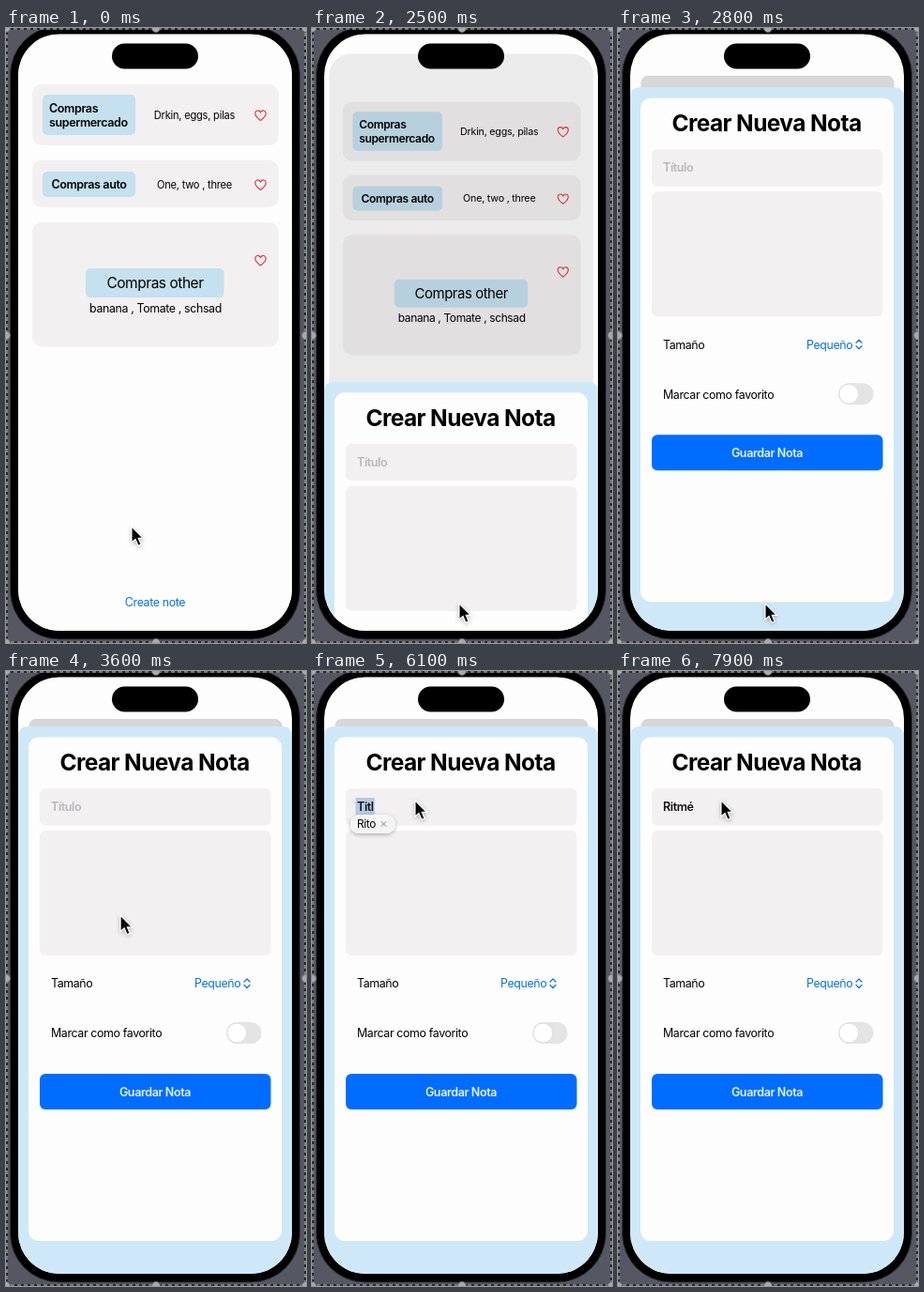
An HTML page for the animation above (8 s loop, 320 px wide and 655 px high).

```html
<!DOCTYPE html>
<html lang="es">
<head>
<meta charset="utf-8">
<title>Notas</title>
<style>
html, body { margin: 0; width: 100%; height: 100%; overflow: hidden; background: #555863; }
svg { display: block; width: 100vw; height: 100vh; }
text { font: 12.4px Inter, sans-serif; letter-spacing: -.03em; fill: #000; white-space: pre; }
.mid { text-anchor: middle; }
.bold { font-weight: 600; font-size: 12.5px; }
.small { font-size: 11.1px; letter-spacing: -.02em; }
.heading { font-size: 15.5px; }
.title { font-size: 24.5px; font-weight: 700; letter-spacing: -.025em; }
.link { fill: #0873e0; }
.card, .input { fill: #f2f0f1; }
.label { fill: #c5e0ee; }
.line { fill: none; stroke-linecap: round; stroke-linejoin: round; }
</style>
</head>
<body>
<svg viewBox="0 0 320 655">
  <defs>
    <clipPath id="screen"><rect x="13" y="6.5" width="292" height="635.5" rx="44"/></clipPath>
    <path id="heart" class="line" stroke="#df3a35" stroke-width="1.15"
      d="M0 5.5C-3 3.4-5.7 1-5.7-1.9C-5.7-5.6-1.5-6.2 0-3C1.5-6.2 5.7-5.6 5.7-1.9C5.7 1 3 3.4 0 5.5Z"/>
    <filter id="shadow" x="-50%" y="-50%" width="200%" height="200%">
      <feDropShadow dx="0" dy="1.5" stdDeviation="2" flood-opacity=".28"/>
    </filter>
  </defs>

  <rect width="320" height="655" fill="#555863"/>
  <rect x="4.5" y="-2" width="309" height="653" rx="52" fill="#000" stroke="#34353a"/>
  <g clip-path="url(#screen)">
    <rect x="13" y="6" width="292" height="637" fill="#fdfdfd"/>
    <g id="home">
      <rect id="page" x="13" y="7" width="292" height="636" fill="#fdfdfd"/>
      <rect class="card" x="28" y="60" width="263" height="65" rx="10"/>
      <rect class="label" x="39" y="71" width="99" height="43" rx="5"/>
      <text class="bold" x="46" y="89.5">Compras</text>
      <text class="bold" x="46" y="105">supermercado</text>
      <text class="small mid" x="201" y="97">Drkin, eggs, pilas</text>
      <use href="#heart" x="271.5" y="93"/>

      <rect class="card" x="28" y="141" width="263" height="50" rx="10"/>
      <rect class="label" x="39" y="153" width="99" height="27" rx="5"/>
      <text class="bold mid" x="88.5" y="171">Compras auto</text>
      <text class="small mid" x="201" y="170.5">One, two , three</text>
      <use href="#heart" x="271.5" y="167"/>

      <rect class="card" x="28" y="207" width="263" height="132.5" rx="10"/>
      <rect class="label" x="85" y="256" width="147.5" height="31" rx="5"/>
      <text class="heading mid" x="159" y="277">Compras other</text>
      <text class="mid" x="159.5" y="303">banana , Tomate , schsad</text>
      <use href="#heart" x="271.5" y="247.5"/>
      <text id="create" class="link mid" x="159" y="615.5">Create note</text>
      <rect id="dim" x="13" y="7" width="292" height="636"/>
    </g>

    <g id="sheet">
      <rect x="13" y="59" width="292" height="640" rx="9" fill="#cfe8f7"/>
      <rect x="24" y="70.5" width="270" height="536.5" rx="11" fill="#fdfdfd"/>
      <text class="title mid" x="158.5" y="106">Crear Nueva Nota</text>
      <rect class="input" x="36" y="125" width="246.5" height="39.5" rx="6"/>
      <rect class="input" x="36" y="170" width="246.5" height="133" rx="6"/>
      <rect id="highlight" x="46.5" y="135" height="19" fill="#b3cbe5"/>
      <text id="field" class="bold" x="48" y="149"></text>
      <rect id="caret" y="136.5" width="1.4" height="16.5" fill="#2f80e8"/>

      <text x="48" y="337.3">Tamaño</text>
      <text class="link" x="201" y="337.3">Pequeño</text>
      <path class="line" stroke="#0873e0" stroke-width="1.2" d="M254 331l3-3l3 3M254 334.5l3 3l3-3"/>
      <text x="48" y="390.3">Marcar como favorito</text>
      <rect x="235" y="374" width="37.5" height="23" rx="11.5" fill="#e4e4e6"/>
      <circle cx="246.3" cy="385.5" r="10.3" fill="#fff" stroke="#d6d6d8" stroke-width=".6"/>
      <rect x="36" y="429" width="246.5" height="38" rx="6" fill="#006dff"/>
      <text class="bold mid" x="159" y="452.5" style="fill:#e9f3ff">Guardar Nota</text>

      <g id="suggestion">
        <rect x="41" y="153" width="47.5" height="20" rx="9" fill="#f5f4f5" filter="url(#shadow)"/>
        <text x="48" y="167" style="font-size:11.8px">Rito</text>
        <path class="line" stroke="#858587" stroke-width="1" d="M74 160.5l5 5m0-5l-5 5"/>
      </g>
    </g>
    <rect x="113" y="16.5" width="92" height="27" rx="13.5"/>
  </g>

  <g id="selection">
    <rect x="1" y="1" width="318" height="653" fill="none" stroke="#29292c" stroke-width="2"/>
    <rect x="1" y="1" width="318" height="653" fill="none" stroke="#919196" stroke-width="1.6" stroke-dasharray="4 3"/>
  </g>
  <path id="cursor" d="M0 0V17L4 13.4L7 20.2L10 19L7.2 12.4H12.2Z" stroke="#fff" stroke-width="1.1" filter="url(#shadow)"/>
</svg>
<script>
const LOOP = 8000;
const $ = id => document.getElementById(id);
const clamp = v => Math.max(0, Math.min(1, v));
const mix = (a, b, p) => a + (b - a) * p;
const ease = p => p * p * (3 - 2 * p);
const show = (id, on) => $(id).setAttribute('visibility', on ? 'visible' : 'hidden');

// Selection handles at corners and edge midpoints
for (const x of [0, 160, 320]) for (const y of [0, 327.5, 655]) {
  if (x === 160 && y === 327.5) continue;
  $('selection').insertAdjacentHTML('beforeend',
    `<circle cx="${x}" cy="${y}" r="4.5" fill="#a9a9ac" stroke="#66676c"/>`);
}

const moves = [
  { from: 600, to: 1350, x: 157, y: 613 },
  { from: 3100, to: 3850, x: 110, y: 138 },
];
const typing = [
  [0, ''], [4900, 'T'], [5150, 'Ti'], [5400, 'Tit'], [5700, 'Titl'],
  [6500, 'Rito'], [6800, 'Rit'], [7000, 'Ritm'], [7300, 'Ritmé'],
];
const FOCUS = 4000, BLUR = 7500, CORRECT = [5900, 6500];

function cursorAt(t) {
  let x = 134, y = 531;
  for (const m of moves) {
    const p = ease(clamp((t - m.from) / (m.to - m.from)));
    x = mix(x, m.x, p);
    y = mix(y, m.y, p);
  }
  return `translate(${x} ${y})`;
}

// Critically damped spring, 0 to 1
function sheetProgress(t) {
  const k = Math.max(0, t - 2414.5) * .0182;
  return t > 3000 ? 1 : 1 - (1 + k) * Math.exp(-k);
}

function drawSheet(t) {
  const p = sheetProgress(t);
  const scale = mix(1, .925, p);
  $('sheet').setAttribute('transform', `translate(0 ${596 * (1 - p)})`);
  $('home').setAttribute('transform',
    `translate(${mix(0, .5, p) + 159} ${mix(7, 51, p)}) scale(${scale}) translate(-159 -7)`);
  for (const id of ['page', 'dim']) $(id).setAttribute('rx', mix(38, 8, p));
  $('dim').setAttribute('opacity', .15 * p);
  $('create').setAttribute('opacity', t >= 2200 && t < 2450 ? .35 : 1);
  show('sheet', p > 0);
}

function drawField(t) {
  const [since, value] = typing.filter(([start]) => t >= start).pop();
  const field = $('field');
  field.textContent = value || 'Título';
  field.style.fill = value ? '#111' : '#b8b7b9';
  const width = field.getComputedTextLength();
  const correcting = t >= CORRECT[0] && t < CORRECT[1];
  const focused = t >= FOCUS && t < BLUR && !correcting;
  const blinkOn = (t - Math.max(since, FOCUS)) % 1000 < 550;
  $('caret').setAttribute('x', value ? 47.6 + width : 47.5);
  $('highlight').setAttribute('width', width + 2.5);
  show('caret', focused && blinkOn);
  // Hidden groups inherit from the sheet, so only force visibility while correcting
  show('highlight', correcting);
  show('suggestion', correcting);
}

function frame(now) {
  const t = now % LOOP;
  $('cursor').setAttribute('transform', cursorAt(t));
  drawSheet(t);
  drawField(t);
  requestAnimationFrame(frame);
}
requestAnimationFrame(frame);
</script>
</body>
</html>
```
